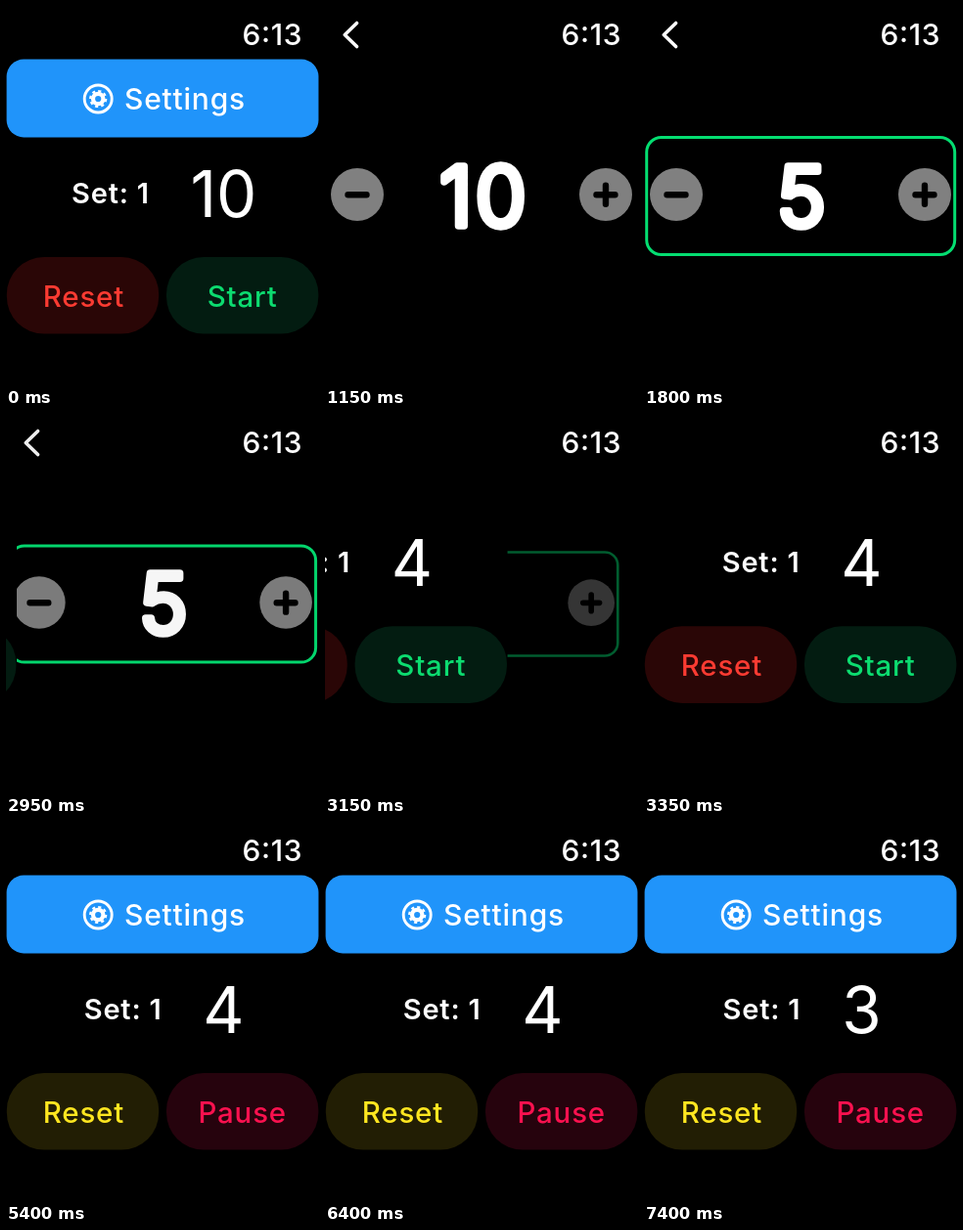
An HTML page for the animation above (8 s loop, 320 by 389 pixels).

```html
<!DOCTYPE html>
<html lang="en">
<head>
<meta charset="utf-8">
<title>Watch interval timer</title>
<style>
  html, body { margin: 0; width: 100%; height: 100%; overflow: hidden; background: #000; }
  svg { display: block; width: 100%; height: 100%; }
  text { font: 400 30px Inter, sans-serif; letter-spacing: .8px; text-anchor: middle; fill: #fff; }
  .medium { font-weight: 500; }
  .clock { font-weight: 550; letter-spacing: .6px; font-feature-settings: "case", "calt"; }
  .set { font-size: 29px; font-weight: 600; }
  .count { font-size: 65.5px; letter-spacing: 0; }
  .value { font-size: 84px; font-weight: 300; letter-spacing: 3.5px; stroke: #fff; stroke-width: 7.5; stroke-linejoin: round; }
  .button rect { fill: var(--back); }
  .button text { fill: var(--ink); font-size: 29.5px; font-weight: 500; }
  .red { --ink: #fa3b32; --back: #2a0606; }
  .green { --ink: #0cdc70; --back: #031c11; }
  .yellow { --ink: #ffe620; --back: #221e04; }
  .pink { --ink: #fa114f; --back: #26030d; }
  .line { fill: none; stroke-linecap: round; stroke-linejoin: round; }
</style>
</head>
<body>
<svg viewBox="0 0 320 389">
  <rect width="320" height="389"/>

  <g id="editor">
    <rect id="focus" x="2.7" y="134.5" width="315" height="120" rx="15" fill="none" stroke="#04de71" stroke-width="3"/>
    <g fill="#808080">
      <circle cx="33" cy="193" r="27"/>
      <circle cx="287" cy="193" r="27"/>
    </g>
    <path class="line" d="M23.5 193.2h19M277.5 193.2h19M287 183.7v19" stroke="#000" stroke-width="6.4"/>
    <text id="value" class="value" x="163.2" y="224.5">10</text>
  </g>

  <g id="main">
    <rect width="320" height="389"/>
    <g id="settings">
      <rect x=".6" y="54.6" width="318.9" height="79.8" rx="17.5" fill="#2094fa"/>
      <g fill="none" stroke="#fff">
        <circle cx="94.2" cy="95" r="14" stroke-width="2.9"/>
        <circle cx="94.2" cy="95" r="5.2" stroke-width="4.2"/>
        <circle cx="94.2" cy="95" r="8" stroke-width="2.2" pathLength="16" stroke-dasharray="1 1"/>
      </g>
      <text class="medium" x="183" y="106">Settings</text>
    </g>
    <g id="controls">
      <text id="set" class="set" x="107" y="202">Set: 1</text>
      <text id="count" class="count" x="222.4" y="216">10</text>
      <g id="reset" class="button red">
        <rect x=".8" y="257" width="155.4" height="78.6" rx="38"/>
        <text x="79.4" y="307.6">Reset</text>
      </g>
      <g id="toggle" class="button green">
        <rect x="164" y="257" width="155.4" height="78.6" rx="38"/>
        <text id="action" x="241.7" y="307.6">Start</text>
      </g>
    </g>
  </g>

  <path id="back" class="line" d="M32.6 17.4L20.2 29.5L32.6 41.6" stroke="#fff" stroke-width="3.5"/>
  <text class="clock" x="272.4" y="40">6:13</text>
</svg>
<script>
  const LOOP = 8000, TICK = 50;
  const OPEN = 1150, FOCUS = 1350, LEAVE = 2900, HOME = 3350, RUN = 5400, SECOND = 7400;
  const el = id => document.getElementById(id);
  const attr = (id, name, value) => el(id).setAttribute(name, value);
  const label = (id, value) => { if (el(id).textContent !== value) el(id).textContent = value; };
  const show = (id, on) => attr(id, "display", on ? "inline" : "none");
  const progress = (t, from, to) => Math.min(1, Math.max(0, (t - from) / (to - from)));
  const smooth = u => u * u * (3 - 2 * u);

  function render(time) {
    const t = Math.floor(time / TICK) * TICK;
    const editing = t >= OPEN && t < HOME;
    const running = t >= RUN;
    const home = smooth(progress(t, LEAVE, HOME));

    show("editor", editing);
    show("back", editing);
    show("main", t < OPEN || t > LEAVE);
    show("settings", t < OPEN || running);

    // The main page slides over the editor, which shrinks and dims.
    const scale = 1 - .2 * home;
    attr("editor", "transform", `translate(160 194.5) scale(${scale}) translate(-160 -194.5)`);
    attr("editor", "opacity", 1 - home);
    attr("back", "opacity", Math.max(0, 1 - 2 * home));
    attr("main", "transform", `translate(${t < OPEN ? 0 : -320 * (1 - home)} 0)`);
    attr("controls", "transform", `translate(0 ${t < OPEN || running ? 0 : -39.7})`);

    attr("focus", "opacity", progress(t, FOCUS - TICK, FOCUS + 4 * TICK));
    label("value", t < FOCUS + 2 * TICK ? "10" : "5");

    label("count", t < OPEN ? "10" : t < SECOND ? "4" : "3");
    attr("set", "x", t < OPEN ? 107 : t < SECOND ? 119.7 : 120.5);
    label("action", running ? "Pause" : "Start");
    attr("reset", "class", `button ${running ? "yellow" : "red"}`);
    attr("toggle", "class", `button ${running ? "pink" : "green"}`);
  }

  const start = performance.now();
  function frame() {
    render((performance.now() - start) % LOOP);
    requestAnimationFrame(frame);
  }
  frame();
</script>
</body>
</html>
```
